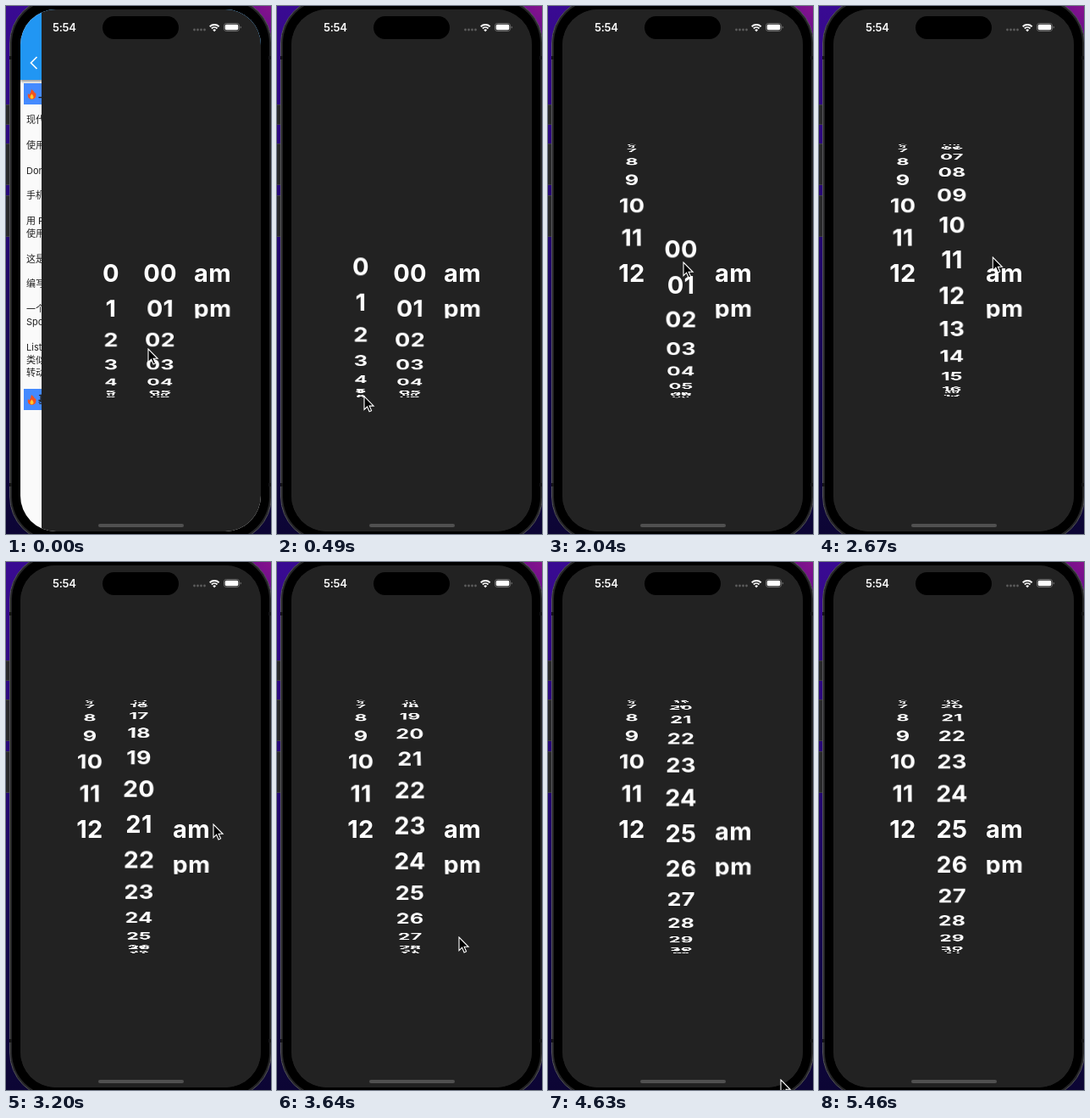
Write an HTML page that moves like this. It is 313 px wide and 622 px high and loops after 5560 ms.

```html
<!DOCTYPE html>
<html lang="zh">
<head>
<meta charset="utf-8">
<title>Time wheel</title>
<style>
html, body { margin: 0; width: 100%; height: 100%; overflow: hidden; background: #12073c; }
#stage { position: relative; width: 313px; height: 622px; overflow: hidden;
  background: radial-gradient(circle at 313px 0, #86128c, rgba(90, 14, 120, 0) 90px),
    linear-gradient(#390a92, #240870 45%, #13074a 75%, #0c0534); }
#stage div, #stage svg { position: absolute; box-sizing: border-box; }
.key { left: -3px; width: 8px; background: #29292b; border: 1px solid #3e3e40; }
#phone { left: 4px; top: -10px; width: 310px; height: 642px; border-radius: 54px; background: #000;
  border: 1px solid #58585c; box-shadow: inset 0 0 0 2px #252527; }
.band { width: 3px; height: 4px; background: #151517; }
#screen { inset: 0; background: #222; clip-path: inset(4px 12px 3px 17px round 42px); }
#under { inset: 0; background: #fafafa; }
#bar { left: 17px; top: 0; width: 284px; height: 87px; background: #2196f3; box-shadow: 0 2px 3px #0006; }
.line { left: 24px; white-space: nowrap; color: #222;
  font: 11px/16px Inter, "Noto Sans CJK SC", "Noto Sans CJK", sans-serif; }
.head { left: 21px; width: 276px; height: 25px; background: #448aff; color: #222;
  font: bold 11px/25px "Noto Sans CJK SC", "Noto Sans CJK", sans-serif; padding-left: 17px; }
.head svg { left: 4px; top: 7px; }
#page { left: 17px; top: 0; width: 284px; height: 622px; background: #222; }
.item { top: 294px; width: 80px; height: 32.5px; overflow: hidden; text-align: center; color: #fff;
  font: 700 29px/42px Inter, sans-serif; letter-spacing: .3px; transform-origin: 50% 18px; }
#island { left: 114px; top: 12px; width: 90px; height: 27px; border-radius: 14px; background: #000; }
#clock { left: 55px; top: 17px; color: #fff; font: 600 13px/16px Inter, sans-serif; letter-spacing: -.3px; }
#home { left: 109px; top: 610px; width: 101px; height: 3.5px; border-radius: 2px; background: #505050; }
</style>
</head>
<body>
<div id="stage">
  <div class="key" style="top:116px;height:24px"></div>
  <div class="key" style="top:162px;height:49px"></div>
  <div class="key" style="top:223px;height:49px"></div>
  <div id="phone"></div>
  <div class="band" style="left:4px;top:59px"></div>
  <div class="band" style="left:4px;top:562px"></div>
  <div class="band" style="left:310px;top:59px"></div>
  <div class="band" style="left:310px;top:562px"></div>
  <div id="screen">
    <div id="under">
      <div id="bar"></div>
      <svg width="60" height="90" style="left:0;top:0"><path d="M36.5 60l-7 7 7 7" fill="none" stroke="#fff" stroke-width="1.7"/></svg>
    </div>
    <div id="page"></div>
  </div>
  <div id="island"></div>
  <div id="clock">5:54</div>
  <svg width="70" height="24" viewBox="215 14 70 24" style="left:215px;top:14px">
    <g fill="#5c5c5c"><circle cx="222.5" cy="28" r="1.4"/><circle cx="226.5" cy="28" r="1.4"/><circle cx="230.5" cy="28" r="1.4"/><circle cx="234.5" cy="28" r="1.4"/></g>
    <g fill="none" stroke="#fff" stroke-width="1.9"><path d="M240.700 24.200a7.800 7.800 0 0 1 10.900 0M242.800 26.500a4.800 4.800 0 0 1 6.700 0"/></g>
    <path d="M246.150 30.200l-1.900-2a2.700 2.700 0 0 1 3.800 0z" fill="#fff"/>
    <rect x="257.5" y="20.500" width="18" height="9" rx="2.700" fill="none" stroke="#6c6c6c"/>
    <rect x="258.7" y="21.700" width="15.600" height="6.600" rx="1.700" fill="#fff"/>
    <path d="M276.700 23.500v3q1.300-.5 1.300-1.500t-1.300-1.500z" fill="#6c6c6c"/>
  </svg>
  <div id="home"></div>
  <svg id="cursor" width="16" height="22" style="left:-1px;top:-1px">
    <path d="M1 1v15.600l3.600-3.400 2.500 5.700 2.500-1.100-2.500-5.500h5z" fill="#000" stroke="#fff" stroke-width="1.100"/>
  </svg>
</div>
<script>
const $ = id => document.getElementById(id);
const LOOP = 5560;

function add(parent, cls, html, style) {
  const el = document.createElement('div');
  el.className = cls;
  el.innerHTML = html;
  Object.assign(el.style, style);
  parent.append(el);
  return el;
}

// Page below: a list of notes
const flame = '<svg width="11" height="12"><path d="M5 0q4 3 4 5l1-1q2 7-4.500 8-6-1-4.500-7l1.500 1.500q2-2.500 2.500-6.500z" fill="#f4511e"/><path d="M5.500 5.500q4 5 0 6-4-1 0-6z" fill="#ffca28"/></svg>';
const lines = [[134, '现代'], [164, '使用'], [194, 'Don'], [223, '手机'], [253, '用 F'], [268, '使用'],
  [298, '这是'], [327, '编写'], [357, '一个'], [372, 'Spo'], [402, 'List'], [417, '类似'], [432, '转动']];
for (const [y, text] of lines) add($('under'), 'line', text, { top: y - 8 + 'px' });
add($('under'), 'head', flame + '上', { top: '91px' });
add($('under'), 'head', flame + '基', { top: '450.5px' });

// Cylinder wheels
const RADIUS = 369, DEPTH = 144.5, STEP = 0.1156, REACH = 8.9;

function wheel(x, labels) {
  const items = labels.map(s => add($('page'), 'item', s, { left: x - 57 + 'px' }));
  return pos => items.forEach((el, i) => {
    const k = i - pos;
    el.style.display = Math.abs(k) < REACH ? 'block' : 'none';
    el.style.transform = `perspective(${DEPTH}px) translateZ(${-RADIUS}px) rotateX(${-k * STEP}rad) translateZ(${RADIUS}px)`;
  });
}
const range = (n, fn) => Array.from({ length: n }, (_, i) => fn(i));
const setHour = wheel(99.4, range(13, String));
const setMinute = wheel(157.3, range(60, i => String(i).padStart(2, '0')));
const setHalf = wheel(218.7, ['am', 'pm']);

// Bursts of movement: first step, last step, step count, then the values reached
const start = { page: 25, hour: 0, minute: 0, half: 0, x: 168, y: 404 };
const bursts = [
  [90, 400, 7, { page: 0, x: 103, y: 465 }],
  [450, 640, 5, { hour: 0.9, y: 439 }],
  [670, 1120, 7, { hour: 3.55, y: 343 }],
  [1320, 1530, 3, { hour: 11.7, x: 146, y: 332 }],
  [1830, 2040, 3, { hour: 12, minute: 0.67, x: 160, y: 302 }],
  [2240, 2330, 2, { minute: 5, x: 194, y: 290 }],
  [2530, 2730, 4, { minute: 13.5, x: 209, y: 298 }],
  [2940, 3200, 4, { minute: 21.14, x: 245, y: 309 }],
  [3440, 3612, 3, { minute: 23.1, x: 215, y: 442 }],
  [3698, 3870, 3, { minute: 24.2, half: 1.2, y: 400 }],
  [4050, 4220, 3, { minute: 24.6, half: -0.35, x: 248, y: 574 }],
  [4420, 4420, 1, { minute: 24.77, half: -0.2, x: 260, y: 592 }],
  [4630, 4630, 1, { minute: 24.88, half: -0.06, x: 275, y: 610 }],
  [4710, 4800, 2, { minute: 24.94, half: -0.03, x: 278, y: 630 }],
  [4970, 5050, 2, { minute: 24.97, half: 0 }],
  [5230, 5230, 1, { minute: 25 }]
];

function stateAt(t) {
  const s = { ...start };
  for (const [from, to, n, goal] of bursts) {
    if (t < from) break;
    const gap = (to - from) / (n - 1 || 1) || 1;
    const p = Math.min(n, Math.floor((t - from) / gap + 1e-6) + 1) / n;
    for (const key in goal) {
      const e = key === 'page' ? 1 - (1 - p) ** 2 : p;
      s[key] += (goal[key] - s[key]) * e;
    }
  }
  return s;
}

function draw(t) {
  const s = stateAt(t);
  $('page').style.transform = `translateX(${s.page}px)`;
  $('under').style.display = s.page > 0 ? 'block' : 'none';
  setHour(s.hour);
  setMinute(s.minute);
  setHalf(s.half);
  $('cursor').style.transform = `translate(${s.x}px, ${s.y}px)`;
}

const t0 = performance.now();
function tick() {
  draw((performance.now() - t0) % LOOP);
  requestAnimationFrame(tick);
}
draw(0);
requestAnimationFrame(tick);
</script>
</body>
</html>
```
